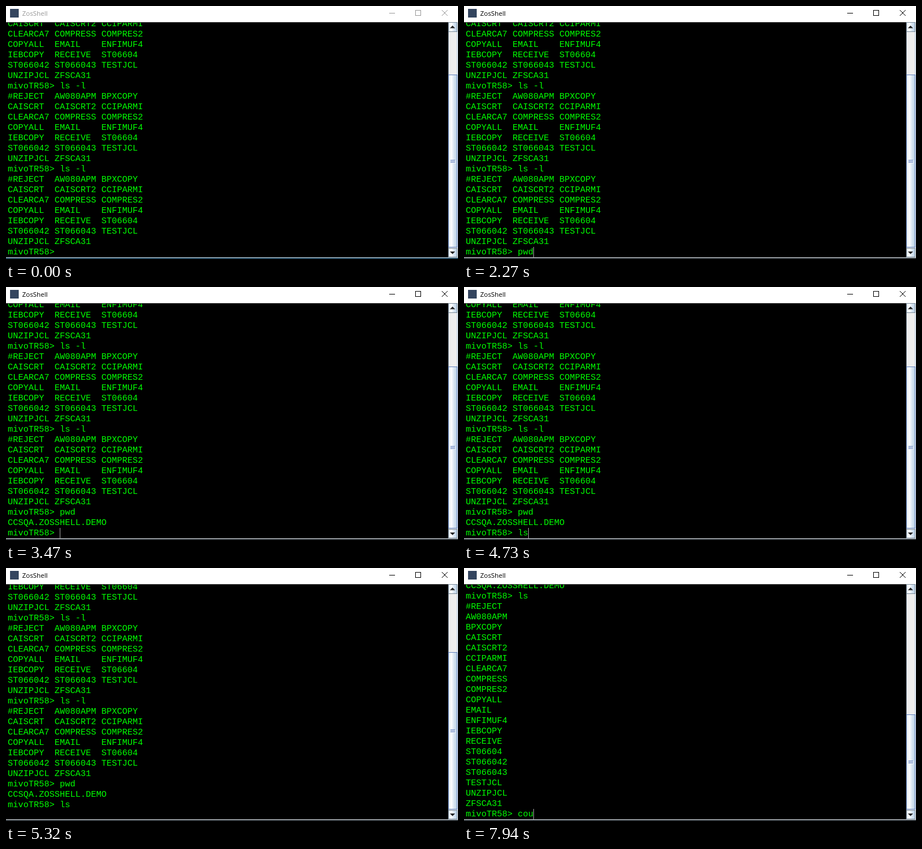
These frames come from a looping animation (782x439 px, 8 s). An HTML page with a canvas:

```html
<!DOCTYPE html>
<html lang="en">
<head>
<meta charset="utf-8">
<title>ZosShell</title>
<style>
  html, body { margin: 0; width: 100%; height: 100%; overflow: hidden; background: #000; }
  canvas { display: block; }
</style>
</head>
<body>
<canvas id="stage" width="782" height="439"></canvas>
<script>
const ctx = document.getElementById('stage').getContext('2d');
const LOOP = 8000, ROW = 18, COL = 9, LEFT = 3, TOP = 29, BOTTOM = 436;
const PROMPT = 'mivoTR58> ';
const MEMBERS = ('#REJECT AW080APM BPXCOPY CAISCRT CAISCRT2 CCIPARMI CLEARCA7 ' +
  'COMPRESS COMPRES2 COPYALL EMAIL ENFIMUF4 IEBCOPY RECEIVE ST06604 ' +
  'ST066042 ST066043 TESTJCL UNZIPJCL ZFSCA31').split(' ');

const table = [];
for (let i = 0; i < MEMBERS.length; i += 3) {
  table.push(MEMBERS.slice(i, i + 3).map(m => m.padEnd(9)).join(''));
}

// Scrollback after each command; `thumb` is the top of the scroll thumb.
const listed = [...table, PROMPT + 'ls -l', ...table, PROMPT + 'ls -l', ...table];
const afterPwd = [...listed, PROMPT + 'pwd', 'CCSQA.ZOSSHELL.DEMO'];
const running = [...afterPwd, PROMPT + 'ls'];
const screens = [
  { at: 0, lines: listed, prompt: PROMPT, lastTop: 418, thumb: 119 },
  { at: 2470, lines: afterPwd, prompt: PROMPT, lastTop: 418, thumb: 138 },
  { at: 4860, lines: running, prompt: '', lastTop: 420, thumb: 146 },
  { at: 5860, lines: [...running, ...MEMBERS], prompt: PROMPT, lastTop: 418, thumb: 254 }
];
const typing = [
  [0, ''], [2070, 'p'], [2170, 'pw'], [2270, 'pwd'], [2470, ''],
  [4600, 'l'], [4730, 'ls'], [4860, ''],
  [7600, 'c'], [7800, 'co'], [7940, 'cou']
];
const FOCUS_AT = 880;
const caretOn = [[FOCUS_AT, 1410], [1870, 2940], [3470, 3930], [4460, 5320],
  [5860, 6330], [6870, 7330], [7600, LOOP]];
// Pointer path: time, x, y
const pointerPath = [[130, 163, 437], [270, 155, 434], [480, 155, 434],
  [880, 148, 428], [1080, 148, 428], [1150, 148, 442]];

const latest = (list, t, timeOf) => list.filter(item => timeOf(item) <= t).pop();

function rect(x, y, w, h, color) {
  ctx.fillStyle = color;
  ctx.fillRect(x, y, w, h);
}

function outline(x, y, w, h, color) {
  ctx.strokeStyle = color;
  ctx.lineWidth = 1;
  ctx.strokeRect(x + .5, y + .5, w - 1, h - 1);
}

function text(str, x, y, font, color) {
  ctx.font = font;
  ctx.fillStyle = color;
  ctx.fillText(str, x, y);
}

function drawTitleBar(active) {
  const ink = active ? '#000' : '#999';
  rect(0, 0, 782, TOP - 1, '#fff');
  rect(0, TOP - 1, 782, 1, '#2a2a2a');
  rect(7, 5, 15, 15, '#34455f');
  text('ZosShell', 28, 17, '11.4px "Open Sans", "Noto Sans", sans-serif', ink);
  rect(663, 12, 10, 1, ink);
  outline(708, 7, 10, 10, ink);
  ctx.strokeStyle = ink;
  ctx.beginPath();
  ctx.moveTo(754, 7); ctx.lineTo(764, 17);
  ctx.moveTo(764, 7); ctx.lineTo(754, 17);
  ctx.stroke();
}

function blueFill() {
  const g = ctx.createLinearGradient(766, 0, 780, 0);
  g.addColorStop(0, '#dde8f3');
  g.addColorStop(.3, '#fff');
  g.addColorStop(.6, '#dde8f3');
  g.addColorStop(1, '#b8cfe5');
  return g;
}

function arrowButton(y, h, dir) {
  rect(766, y, 15, h, blueFill());
  outline(765, y, 16, h, '#7a8a99');
  const mid = y + h / 2;
  ctx.fillStyle = '#222';
  ctx.beginPath();
  ctx.moveTo(768, mid + 2 * dir);
  ctx.lineTo(777, mid + 2 * dir);
  ctx.lineTo(772.5, mid - 2.5 * dir);
  ctx.fill();
}

function drawScrollBar(thumb) {
  rect(765, TOP - 1, 17, BOTTOM - TOP + 1, '#eee');
  rect(765, TOP, 1, BOTTOM - TOP, '#7a8a99');
  rect(780, TOP, 1, BOTTOM - TOP, '#b8cfe5');
  arrowButton(TOP - 1, 17, 1);
  arrowButton(420, 16, -1);
  rect(766, thumb, 14, 419 - thumb, blueFill());
  outline(765, thumb, 16, 419 - thumb, '#6382bf');
  const mid = Math.floor((thumb + 419) / 2);
  for (const y of [mid - 2, mid, mid + 2]) {
    rect(769, y, 8, 1, '#6382bf');
    rect(770, y + 1, 8, 1, '#fff');
  }
}

function drawTerminal(t, screen) {
  const typed = latest(typing, t, k => k[0])[1];
  const input = screen.prompt + typed;
  const rows = [...screen.lines, input].reverse();
  ctx.save();
  ctx.beginPath();
  ctx.rect(0, TOP, 765, BOTTOM - TOP);
  ctx.clip();
  rows.slice(0, 24).forEach((line, i) => {
    text(line, LEFT, screen.lastTop - i * ROW + 13,
      '15px "Liberation Mono", "Courier New", monospace', '#0f0');
  });
  if (caretOn.some(([from, to]) => t >= from && t < to)) {
    rect(LEFT + input.length * COL, screen.lastTop, 1, ROW, t < 1410 ? '#666' : '#a4a4a4');
  }
  ctx.restore();
}

function drawPointer(t) {
  const i = pointerPath.findIndex(p => p[0] > t);
  if (i < 1) return;
  const [t0, x0, y0] = pointerPath[i - 1], [t1, x1, y1] = pointerPath[i];
  const k = (t - t0) / (t1 - t0);
  const x = Math.round(x0 + (x1 - x0) * k), y = Math.round(y0 + (y1 - y0) * k);
  rect(x, y - 6, 1, 14, '#fff');
  for (const edge of [y - 7, y + 8]) {
    rect(x - 3, edge, 3, 1, '#fff');
    rect(x + 1, edge, 3, 1, '#fff');
  }
}

function draw(t) {
  const active = t >= FOCUS_AT;
  const screen = latest(screens, t, s => s.at);
  rect(0, 0, 782, 439, '#000');
  drawTitleBar(active);
  drawTerminal(t, screen);
  drawScrollBar(screen.thumb);
  rect(0, 436, 782, 1, active ? '#dfe5ea' : '#cfe0ea');
  rect(0, 437, 782, 2, active ? '#30363b' : '#23475e');
  drawPointer(t);
}

const start = performance.now();
function tick() {
  draw((performance.now() - start) % LOOP);
  requestAnimationFrame(tick);
}
tick();
</script>
</body>
</html>
```
